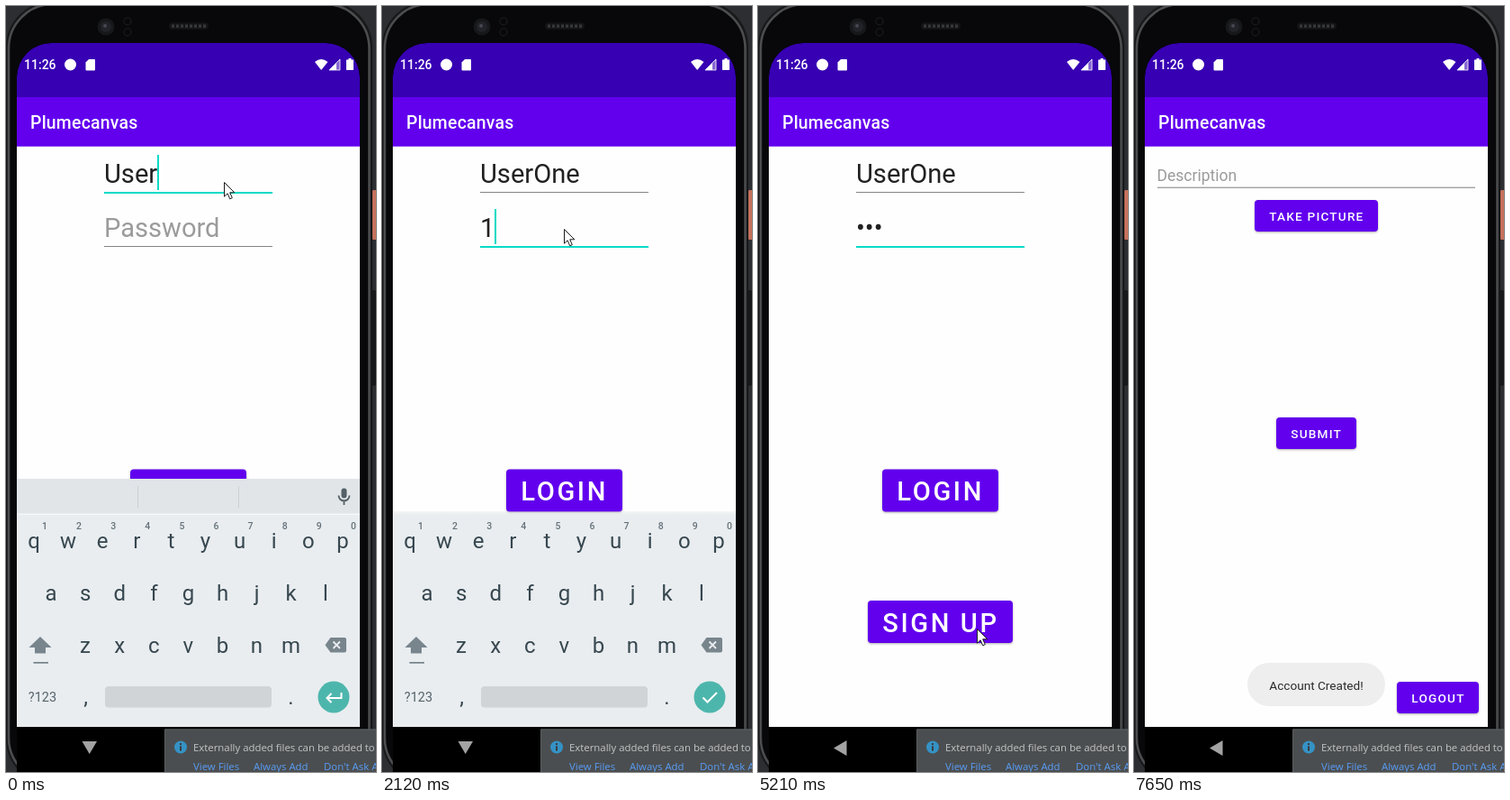
Animation of 411x849 px, one loop 8 s. Source, as an HTML page:

```html
<!DOCTYPE html>
<html lang="en">
<head>
<meta charset="utf-8">
<title>Sign up demo</title>
<style>
html, body { margin: 0; width: 100%; height: 100%; overflow: hidden; background: #2d2e31; }
svg { display: block; width: 411px; height: 849px; font-family: Roboto, sans-serif; }
text { white-space: pre; }
.mid { text-anchor: middle; }
.title { font-size: 19.4px; font-weight: 500; letter-spacing: .0125em; fill: #fff; }
.field { font-size: 29.1px; fill: #212121; }
.btn { filter: drop-shadow(0 1.5px 1.2px rgba(0,0,0,.32)); }
.btn.down { filter: drop-shadow(0 5px 4px rgba(0,0,0,.34)); }
.btn rect { fill: #6200ee; }
.btn text { fill: #fff; font-weight: 500; letter-spacing: .0892em; }
.key { font-size: 24px; fill: #37474f; text-anchor: middle; }
.num { font-size: 10.5px; font-weight: 500; fill: #65727a; text-anchor: middle; }
.hint { font-size: 17px; fill: #65727a; text-anchor: middle; }
.note { font: 11.4px "Open Sans", sans-serif; fill: #c3c4c5; }
.link { fill: #589df6; }
</style>
</head>
<body>
<svg viewBox="0 0 411 849">
  <defs>
    <clipPath id="screen"><rect x="12" y="41" width="381" height="860" rx="38"/></clipPath>
    <clipPath id="signClip"><rect x="122" y="659" width="161" height="47" rx="4"/></clipPath>
    <linearGradient id="edge" x2="0" y2="1">
      <stop offset="0" stop-color="#d9dddf" stop-opacity=".2"/>
      <stop offset="1" stop-color="#e9edf0"/>
    </linearGradient>
    <g id="bars">
      <rect x="12" y="41" width="381" height="900" rx="38"/>
      <path d="M12 101V79a38 38 0 0 1 38-38H355a38 38 0 0 1 38 38V101z" fill="#3700b3"/>
      <rect x="12" y="101" width="381" height="55" fill="#6200ee"/>
      <rect x="12" y="155.700" width="381" height="643.300" fill="#fefefe"/>
      <text class="title" x="27" y="136">Plumecanvas</text>
    </g>
  </defs>

  <!-- phone body -->
  <rect width="411" height="849" fill="#2d2e31"/>
  <rect x="405" y="315" width="6" height="106" rx="2" fill="#17181a"/>
  <rect x="406.5" y="204" width="6" height="55" rx="2" fill="#c5715c"/>
  <rect x="1.5" y="-4" width="404" height="866" rx="50" fill="#08080a" stroke="#17181a" stroke-width="3"/>
  <rect x="3" y="-2" width="400.5" height="862" rx="49" fill="none" stroke="#4c4d4f" stroke-width="2.600"/>
  <circle cx="111" cy="23" r="9.5" fill="#17181a"/>
  <circle cx="111" cy="23" r="6" fill="#212329"/>
  <circle cx="110" cy="22" r="2" fill="#45484e"/>
  <g fill="none" stroke="#17181a" stroke-width="1.500">
    <circle cx="135" cy="17" r="4"/><circle cx="135" cy="29" r="4"/>
  </g>
  <rect x="181" y="18.500" width="44" height="7.500" rx="3.700" fill="#141415"/>
  <path d="M184 22.200H223" stroke="#353639" stroke-width="3.500" stroke-dasharray="3 2"/>

  <g clip-path="url(#screen)">
    <rect x="12" y="41" width="381" height="860"/>
    <g id="login">
      <use href="#bars"/>
      <rect id="userLine" x="109" width="187"/>
      <text id="user" class="field" x="109" y="196"></text>
      <rect id="mark" x="109" y="199" height="1.500" fill="#212121"/>
      <rect id="passLine" x="109" width="187"/>
      <text id="pass" class="field" x="109" y="255.500"></text>
      <rect id="caret" width="2" height="39" fill="#03dac5"/>
      <g id="big"></g>
      <circle id="ripple" cx="247" cy="693" fill="#fff" clip-path="url(#signClip)"/>
      <text id="signText" x="138.300" y="694" font-size="29.100" font-weight="500" fill="#fff" letter-spacing="2.600">SIGN UP</text>
    </g>
    <g id="home">
      <use href="#bars"/>
      <text x="25.500" y="194" font-size="17.500" fill="#9b9b9b">Description</text>
      <rect x="26" y="200.700" width="353" height="1" fill="#7d7d7d"/>
    </g>
    <g id="toast">
      <rect x="126" y="728" width="153" height="48" rx="24" fill="#eee"/>
      <text class="mid" x="202.500" y="757.800" font-size="13.600" fill="#2b2b2b">Account Created!</text>
    </g>

    <!-- status icons -->
    <g fill="#fff">
      <text x="20" y="70" font-size="14" font-weight="500">11:26</text>
      <circle cx="71.500" cy="65" r="6.500"/>
      <path d="M92 59h6q1 0 1 1v10.500q0 1-1 1h-8.500q-1 0-1-1V62.500z"/>
      <path d="M343 62q7-6 14.500 0L350.200 71z"/>
      <path d="M371 59V71H359z" fill-opacity=".4"/><path d="M367 63V71H359z"/><path d="M371 59V71H359z" fill="none" stroke="#fff" stroke-width=".8"/>
      <path d="M380.500 58h3v1.500h2.500V71h-8V59.500h2.500z"/>
    </g>

    <g id="keys">
      <rect id="topEdge" x="12" y="560" width="381" height="6" fill="url(#edge)"/>
      <rect x="12" y="564" width="381" height="235" fill="#e9edf0"/>
      <g id="strip">
        <rect x="12" y="524" width="381" height="39" fill="#e1e5e8"/>
        <rect x="12" y="562.500" width="381" height="1.500" fill="#f6f8f9"/>
        <path d="M146.500 532v24M258.500 532v24" stroke="#cbd0d3"/>
        <text class="hint" id="s0" x="96" y="551"></text>
        <text class="hint" id="s1" x="202.500" y="551" style="fill:#455a64"></text>
        <text class="hint" id="s2" x="308.500" y="551"></text>
        <g id="dots" fill="#455a64"><circle cx="197" cy="560" r="1.500"/><circle cx="202" cy="560" r="1.500"/><circle cx="207" cy="560" r="1.500"/></g>
        <rect x="372.500" y="534.500" width="6" height="11" rx="3" fill="#546067"/>
        <path d="M369.500 542.500a6 6 0 0 0 12 0M375.500 548.500V553" fill="none" stroke="#546067" stroke-width="1.800"/>
      </g>
      <path d="M38 699L50.500 711H44V717.500H32V711H25.500zM30.500 727H47V728.800H30.500z" fill="#78858c"/>
      <path d="M360.500 700H376q2 0 2 2V714.500q0 2-2 2H360.500L354.500 708.200z" fill="#78858c"/>
      <path d="M363.500 704.500l7.500 7.500m0-7.500l-7.500 7.500" stroke="#e9edf0" stroke-width="1.800"/>
      <text class="mid" x="40.500" y="771" font-size="14.500" fill="#55636a">?123</text>
      <rect x="110" y="754" width="185" height="23.500" rx="4" fill="#d0d4d6"/>
      <circle cx="364" cy="766" r="17.500" fill="#4db6ac"/>
      <g fill="none" stroke="#fff" stroke-width="2">
        <path id="enter" d="M372.500 761V767H356.500m5-5l-5 5 5 5"/>
        <path id="check" d="M356.500 766.500l5 5 10.500-10.500"/>
      </g>
    </g>
    <g fill="#a3a3a3"><path id="navDown" d="M84.500 815H101L92.700 829z"/><path id="navBack" d="M98.500 814V831L84 822.500z"/></g>
  </g>

  <!-- notice -->
  <rect x="176" y="801.500" width="240" height="50" fill="#4b4e50"/>
  <path d="M176.500 849V802H411" fill="none" stroke="#5b5e60"/>
  <circle cx="194" cy="821.500" r="7" fill="#3592c4"/>
  <path d="M194 817v2M194 820.200v5.300" stroke="#3a3d3f" stroke-width="2"/>
  <text class="note" x="208" y="826">Externally added files can be added to Git</text>
  <text class="note link" x="208" y="847">View Files</text>
  <text class="note link" x="275" y="847">Always Add</text>
  <text class="note link" x="353" y="847">Don't Ask Again</text>

  <path id="mouse" d="M.5.5V16.200L4.100 12.800L6.700 18.800L9.300 17.700L6.700 11.800H11.800z" fill="#fff" stroke="#1b1b1b" stroke-linejoin="round"/>
</svg>
<script>
const $ = id => document.getElementById(id);
const NS = 'http://www.w3.org/2000/svg';

function add(parent, tag, attrs, text = '') {
  const el = document.createElementNS(NS, tag);
  for (const k in attrs) el.setAttribute(k, attrs[k]);
  el.textContent = text;
  return parent.appendChild(el);
}
function button(parent, label, x, y, w, h, size) {
  const g = add(parent, 'g', { class: 'btn' });
  add(g, 'rect', { x, y, width: w, height: h, rx: 4 });
  add(g, 'text', { x: x + 16.3, y: y + h / 2 + size * .37, 'font-size': size }, label);
  return g;
}
button($('big'), 'LOGIN', 138, 513.5, 129, 47, 29.1);
const signUp = button($('big'), '', 122, 659, 161, 47, 29.1);
button($('home'), 'TAKE PICTURE', 134, 215, 137, 35, 13.6);
button($('home'), 'SUBMIT', 158, 456, 89, 35, 13.6);
button($('home'), 'LOGOUT', 292, 749, 91, 35, 13.6);

function row(chars, x, y, cls) {
  [...chars].forEach((c, i) => add($('keys'), 'text', { x: x + i * 38.1, y, class: cls }, c));
}
row('qwertyuiop', 31, 601, 'key');
row('1234567890', 43, 579.5, 'num');
row('asdfghjkl', 50, 659, 'key');
row('zxcvbnm', 88, 717, 'key');
row(',', 88.5, 774, 'key');
row('.', 316.5, 774, 'key');

// Each track: [start time, value]
const mouse = [[0, [242, 195]], [1090, [213, 200]], [1240, [207, 220]], [1360, [199, 239]], [1480, [202, 247]],
  [2670, [212, 266]], [2790, [232, 302]], [2910, [256, 342]], [3030, [271, 365]], [3150, [274, 370]],
  [3570, [196, 580]], [3690, [92, 826]], [3930, [180, 752]], [4050, [242, 699]], [4170, [242, 692]],
  [4320, [243, 690]], [5710, [244, 690]], [5830, [245, 690]], [7020, [255, 696]], [7170, [260, 699]], [7410, null]];
const user = [[0, 'User'], [120, 'UserO'], [240, 'UserOn'], [670, 'UserOne']];
const pass = [[0, ''], [2120, '1'], [2400, '•2'], [2550, '••3'], [4170, '•••']];
const marked = [[0, 0], [390, 6], [940, 7], [1750, 0]];
const hints = [[0, ['', '', '']], [240, ['users', 'UserO', 'user on']], [390, ['users', 'UserOn', 'user once']],
  [790, ['usefulness', 'UserOn', 'user once']], [940, ['usefulness', 'UserOne', 'the staff']]];
const caret = [[0, 1], [1240, 0], [1630, 1], [3150, 0], [3570, 1], [4170, 0], [4750, 1], [5210, 0], [5710, 1], [6140, 0]];
const slide = [[0, 0], [3810, 130], [3930, 300]];
const ripple = [[0, [0, 0]], [6540, [106, .25]], [6660, [160, .25]], [6780, [160, .15]], [6900, [160, .06]], [7020, [0, 0]]];
const oldWin = [[0, [1, 1]], [7020, [1.002, .96]], [7170, [1.045, .7]], [7290, [1.049, .4]], [7410, [1.05, 0]]];
const newWin = [[0, 0], [7170, .992], [7290, .997], [7410, .999], [7530, 1]];
const toast = [[0, 0], [7170, .78], [7290, 1]];

const at = (track, t) => track.findLast(s => s[0] <= t)[1];
const set = (id, attrs) => { for (const k in attrs) $(id).setAttribute(k, attrs[k]); };
const show = (id, on) => { $(id).style.display = on ? '' : 'none'; };
const zoom = s => `translate(202.5 420) scale(${s}) translate(-202.5 -420)`;
const line = (id, y, on) => set(id, { y, height: on ? 2 : 1, fill: on ? '#03dac5' : '#858585' });

function draw(t) {
  const onPass = t >= 1630, typed = at(pass, t);
  $('user').textContent = at(user, t);
  $('pass').textContent = typed || 'Password';
  $('pass').style.fill = typed ? '#212121' : onPass ? '#757575' : '#9b9b9b';
  line('userLine', 206, t < 1750);
  line('passLine', 266, onPass);

  const n = at(marked, t);
  set('mark', { width: n ? $('user').getSubStringLength(0, n) : 0 });
  const field = $(onPass ? 'pass' : 'user');
  const len = onPass && !typed ? 0 : field.getComputedTextLength();
  set('caret', { x: Math.round(109 + len), y: onPass ? 225 : 165 });
  show('caret', at(caret, t));

  at(hints, t).forEach((s, i) => { $('s' + i).textContent = s; });
  show('dots', t >= 240);
  show('strip', t < 1750);
  show('topEdge', t >= 1750);
  show('enter', t < 1750);
  show('check', t >= 1750);
  const dy = at(slide, t);
  set('keys', { transform: `translate(0 ${dy})` });
  show('keys', dy < 300);
  show('navDown', t < 3810);
  show('navBack', t >= 3810);

  const [r, glow] = at(ripple, t);
  set('ripple', { r, opacity: glow });
  signUp.classList.toggle('down', glow > .1);

  const [s, alpha] = at(oldWin, t), z = at(newWin, t);
  set('login', { transform: zoom(s), opacity: alpha });
  show('home', z);
  set('home', { transform: zoom(z || 1) });
  set('toast', { opacity: at(toast, t) });

  const p = at(mouse, t);
  show('mouse', p);
  if (p) set('mouse', { transform: `translate(${p})` });
}

let start;
function tick(now) {
  start ??= now;
  draw((now - start) % 8000);
  requestAnimationFrame(tick);
}
draw(0);
requestAnimationFrame(tick);
</script>
</body>
</html>
```
